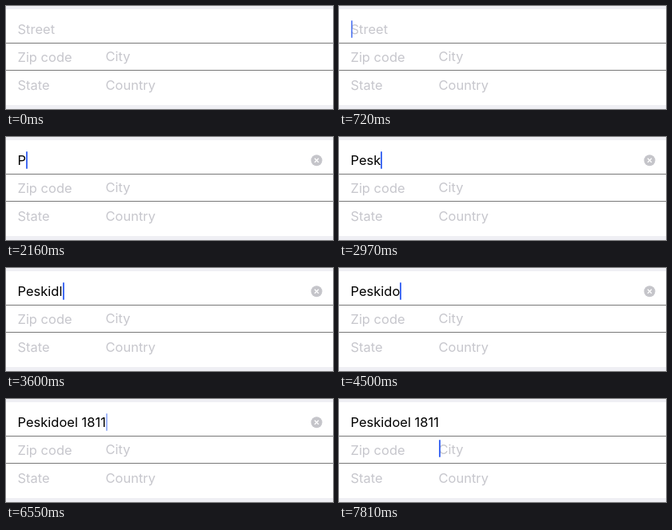
An HTML page for the animation above (8 s loop, 409 by 129 pixels).

```html
<!DOCTYPE html>
<html lang="en">
<head>
<meta charset="utf-8">
<title>Address form</title>
<style>
  html, body { margin: 0; width: 100%; height: 100%; overflow: hidden; background: #efeff4; }
  svg { display: block; width: 409px; height: 129px; }
  text { font: 16.5px Inter, Roboto, sans-serif; fill: #c7c7cd; white-space: pre; }
  #street { fill: #000; }
</style>
</head>
<body>
<svg viewBox="0 0 409 129">
  <rect width="409" height="129" fill="#efeff4"/>
  <rect y="4" width="409" height="120" fill="#fff"/>
  <path d="M0 46.5H409M0 80.5H409" stroke="#787878"/>
  <text id="hint" x="14.5" y="35">Street</text>
  <text x="14.5" y="70">Zip code</text>
  <text x="124.5" y="69">City</text>
  <text x="14.5" y="105">State</text>
  <text x="124.5" y="105">Country</text>
  <text id="street" x="14.5" y="35"></text>
  <g id="clear">
    <circle cx="388.5" cy="29.3" r="7" fill="#c5c5ca"/>
    <path d="M386 26.8l5 5m0-5l-5 5" stroke="#fff" stroke-width="1.3"/>
  </g>
  <rect id="caret" width="2" height="22" rx="1" fill="#426bf2"/>
</svg>
<script>
  const LOOP = 8000;
  const TICK = 90;
  const FOCUS_STREET = 180, FOCUS_CITY = 6730;
  const BLINK = 1080, FADE = 180, FADE_OUT = 450;
  const START_PHASE = BLINK - TICK / 2;
  const $ = id => document.getElementById(id);
  const hint = $('hint'), street = $('street'), clear = $('clear'), caret = $('caret');

  // Bursts of typing, one key per tick; '<' is backspace.
  const bursts = [
    [2160, 'P'], [2430, 'es'], [2970, 'k'], [3420, 'idl'], [4140, '<'],
    [4500, 'o'], [4680, 'el'], [5210, ' '], [5480, '18'], [5740, '1'], [6010, '1']
  ];
  const keys = bursts.flatMap(([at, text]) =>
    [...text].map((key, i) => ({ at: at + i * TICK, key })));

  const clamp = v => Math.min(1, Math.max(0, v));
  const show = (el, on) => el.setAttribute('visibility', on ? 'visible' : 'hidden');

  // Solid, fade out, hidden, fade in.
  function blink(age) {
    const p = age % BLINK;
    return clamp(1 - (p - FADE_OUT) / FADE) + clamp(1 - (BLINK - p) / FADE);
  }

  // Every key press or change of field restarts the blinking.
  function caretOpacity(t, pressed) {
    if (t < FOCUS_STREET) return 0;
    const idle = !pressed.length;
    const since = t >= FOCUS_CITY ? FOCUS_CITY : idle ? FOCUS_STREET : pressed.at(-1).at;
    const age = Math.floor((t - since) / TICK) * TICK;
    return blink(age + (idle ? START_PHASE : 0));
  }

  function draw(t) {
    const pressed = keys.filter(k => k.at <= t);
    const value = pressed.reduce((s, { key }) => key === '<' ? s.slice(0, -1) : s + key, '');
    const inCity = t >= FOCUS_CITY;
    if (street.textContent !== value) street.textContent = value;
    show(hint, !value);
    show(clear, value && !inCity);
    const end = value ? street.getComputedTextLength() : 0;
    caret.setAttribute('x', inCity ? 125 : Math.round(14.6 + end));
    caret.setAttribute('y', inCity ? 51 : 18);
    caret.setAttribute('opacity', caretOpacity(t, pressed));
  }

  const start = performance.now();
  function tick() {
    draw((performance.now() - start) % LOOP);
    requestAnimationFrame(tick);
  }
  tick();
</script>
</body>
</html>
```
